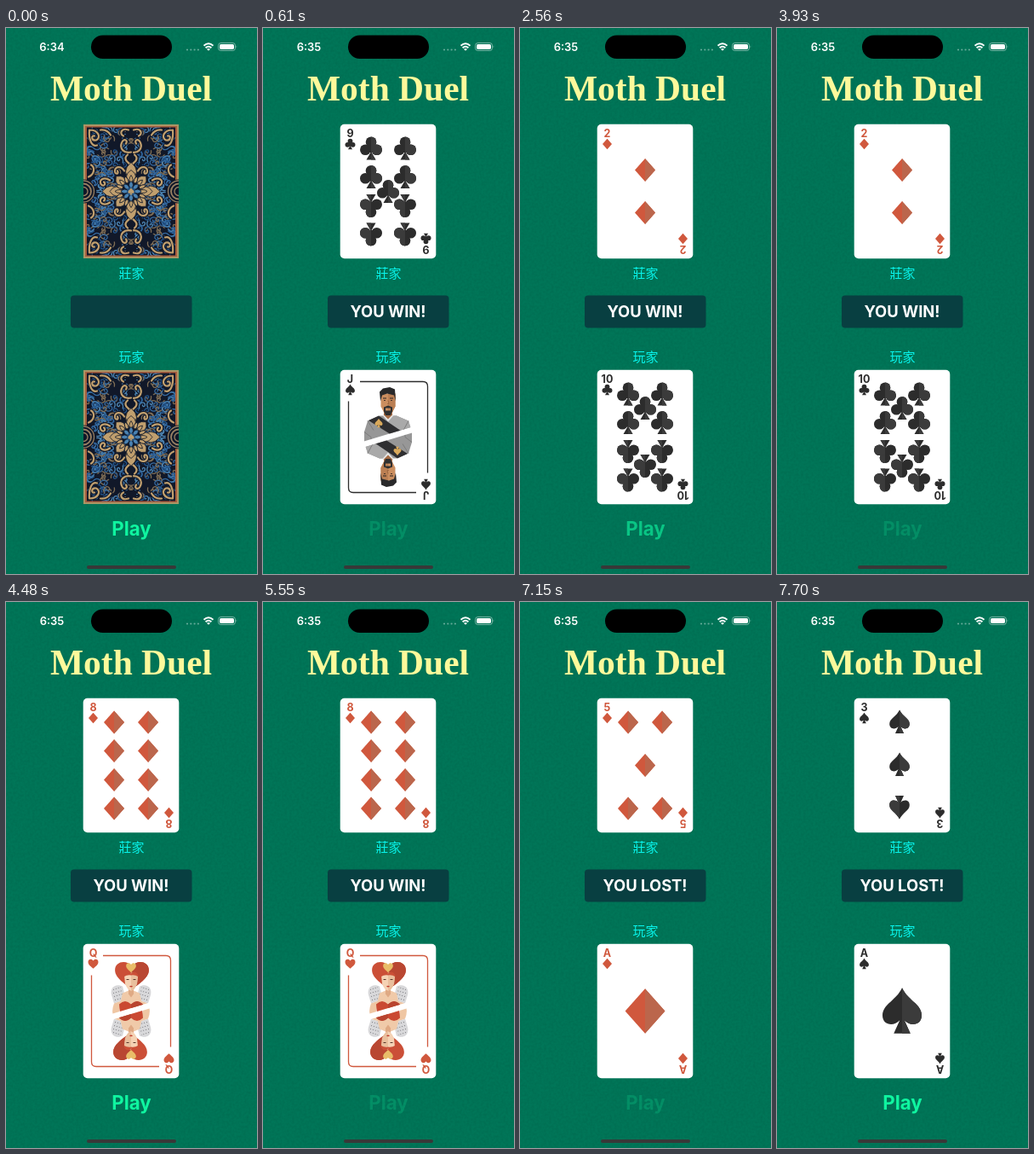
An HTML page for the animation above (8 s loop, 295 by 640 pixels).

```html
<!DOCTYPE html>
<html lang="zh-Hant">
<head>
<meta charset="utf-8">
<title>Moth Duel</title>
<style>
html, body { margin: 0; width: 100%; height: 100%; overflow: hidden; background: #007456; }
svg { display: block; width: 100vw; height: 100vh; }
text { text-anchor: middle; font-family: Inter, "Open Sans", sans-serif; font-weight: 600; }
.title { font: 700 41.5px "Liberation Serif", "Noto Serif", serif; fill: #fdf99b; }
.label { font: 500 15px "Noto Sans CJK TC", "Noto Sans CJK", "Noto Sans CJK SC", sans-serif; fill: #08f3ea; }
.index { font-size: 12.5px; font-weight: 700; }
.bold { font-weight: 700; }
</style>
</head>
<body>
<svg id="stage" viewBox="0 0 295 640" preserveAspectRatio="none"></svg>
<script>
const LOOP = 8000;
const RED = "#d0583d", BLACK = "#2c2c2c", TAN = "#c09f6e", NAVY = "#111829";

// Rounds: press time, deal time, dealer card, player card, message
const ROUNDS = [
  [500, 610, "9C", "JS", "YOU WIN!"],
  [2220, 2340, "2D", "10C", "YOU WIN!"],
  [3930, 4030, "8D", "QH", "YOU WIN!"],
  [5550, 5660, "5D", "AD", "YOU LOST!"],
  [7150, 7260, "3S", "AS", "YOU LOST!"]
];
// Button opacity by time since the press
const FADE = [[0, .2], [210, .4], [320, .63], [430, .84], [540, 1]];

const SUITS = {
  D: '<path d="M0-13.500L12 0 0 13.500-12 0Z"/>',
  S: '<path d="M0-14C2-10 4-8.500 7-5.500C10-3 11.800-.5 11.800 2.500C11.800 8.500 5 9.500 1.400 5.500L5 13.500H-5L-1.400 5.500C-5 9.500-11.800 8.500-11.800 2.500C-11.800-.5-10-3-7-5.500C-4-8.500-2-10 0-14Z"/>',
  C: '<circle cy="-7.200" r="6.300"/><circle cx="-6.700" cy="1.800" r="6.300"/><circle cx="6.700" cy="1.800" r="6.300"/>' +
     '<path d="M-3-4H3V5H-3ZM0 4L5.500 13.500H-5.500Z"/>',
  H: '<path d="M0 12.500C-4 8-13 3-13-4.500C-13-12-4-14 0-7.500C4-14 13-12 13-4.500C13 3 4 8 0 12.500Z"/>'
};

const isRed = s => s === "D" || s === "H";
const ink = s => isRed(s) ? RED : BLACK;

function pip(s, x, y, scale = 1, flip = false) {
  const shade = isRed(s) ? "#bb664c" : "#3b3b3b";
  return `<g transform="translate(${x} ${y}) rotate(${flip ? 180 : 0}) scale(${scale})">
    <g fill="${ink(s)}">${SUITS[s]}</g>
    ${scale < .6 ? "" : `<g fill="${shade}" clip-path="url(#right)">${SUITS[s]}</g>`}</g>`;
}

const twice = art => art + `<g transform="rotate(180)">${art}</g>`;
const mirror = art => art + `<g transform="scale(-1 1)">${art}</g>`;

// Pip places from the card centre; each is repeated upside down
const COLS = [-20, 20];
const pairs = rows => rows.flatMap(y => COLS.map(x => [x, y]));
const LAYOUT = {
  2: [[0, -25]],
  5: pairs([-50.5]),
  8: pairs([-50.5, -17]),
  9: pairs([-50.5, -17]),
  10: [...pairs([-50.5, -17]), [0, -34]]
};

function pips(rank, s) {
  if (rank === "A") return pip(s, 0, 0, 1.95);
  if (rank === "3") return pip(s, -3, -51) + pip(s, -3, -1) + pip(s, -3, 49, 1, true);
  const flip = s !== "D";
  let art = LAYOUT[rank].map(([x, y]) => pip(s, x, y) + pip(s, x, -y, 1, flip)).join("");
  if (rank === "9" || rank === "5") art += pip(s, 0, 0);
  return art;
}

const JACK = `
  <path d="M-28 14V-6L-24-19-10-25H10L24-19 28-6V12Z" fill="#979797"/>
  <path d="M0-25H10L24-19 28-6V12H0Z" fill="#a9a9a9"/>
  <path d="M-28-6L-20 0V12M-24-19L-17-8M24-19L18-8 28-4" fill="none" stroke="#7c7c7c" stroke-width="1"/>
  <path d="M-23-19.500L-11-25 26 0 24 10Z" fill="#2f2f31"/>
  <path d="M-7-26L0-18 7-26Z" fill="#e6e6e6"/>
  <path d="M-5-34H5V-26L0-21-5-26Z" fill="#a56b44"/>
  <g transform="translate(-11 -16.500) scale(.38)" fill="#d9a95c">${SUITS.S}</g>
  <path d="M-8.500-51H8.500V-36L4-27H-4L-8.500-36Z" fill="#cb8e5f"/>
  <path d="M0-51H8.500V-36L4-27H0Z" fill="#bb7f53"/>
  <path d="M-9-42L-10-53-6-57 2-58.500 8-56 9-42 7-49-1-51-7-49Z" fill="#29292a"/>
  <path d="M-5-30V-35L0-37 5-35V-30L3-25.500H-3ZM-3-34V-31H3V-34Z" fill="#303030" fill-rule="evenodd"/>
  <path d="M-6-45.500H-2M2-45.500H6" stroke="#2b2522" stroke-width="1.200"/>
  <path d="M-5-43H-3M3-43H5" stroke="#45342a" stroke-width="1.200"/>
  <path d="M0-43L1-39H-1" fill="none" stroke="#925d3a" stroke-width=".7"/>`;

const SLEEVE = `
  <path d="M-10-29C-19-33-25-27-23-19L-20-9-11-12-8-21Z" fill="#d8d8da"/>
  <path d="M-21-25L-12-28M-21-21L-10-24M-20-17L-10-20M-19-13L-11-15" stroke="#77777c" stroke-width="1" stroke-dasharray="1 2"/>
  <path d="M-20-9L-11-12-14 0-10 12H-17Q-25 4-20-9Z" fill="#efc6a3"/>`;

const QUEEN = `
  <g transform="translate(1 -42) scale(1.530 1.350)">
    <g fill="#cb4f37">${SUITS.H}</g><g fill="#b94732" clip-path="url(#right)">${SUITS.H}</g></g>
  ${mirror(SLEEVE)}
  <path d="M-10-21L-3-24H3L10-21 13-8 11 12H-12L-13-8Z" fill="#f0caa9"/>
  <path d="M-14-8Q-7-15 0-8Q7-15 14-8L12 14H-12Z" fill="#ca4932"/>
  <path d="M0-8Q7-15 14-8L12 14H0Z" fill="#b8442f"/>
  <path d="M-3-27H3V-20L0-16-3-20Z" fill="#dfa984"/>
  <path d="M-8-42Q0-47 8-42L7-32Q4-24 0-24Q-4-24-7-32Z" fill="#f5d2b4"/>
  <path d="M0-45Q5-45 8-42L7-32Q4-24 0-24Z" fill="#e9bf9d"/>
  <path d="M-9-40Q-6-49 0-44Q6-49 9-40Q4-43 0-42Q-4-43-9-40Z" fill="#cb4f37"/>
  <path d="M-5.500-37H-2.500M2.500-37H5.500" stroke="#57372c" stroke-width="1.100"/>
  <path d="M-2-29Q0-30.500 2-29Q0-27 -2-29Z" fill="#c03d2d"/>
  <g transform="translate(0 -51) scale(.45)" fill="#e9bd69">${SUITS.H}</g>`;

function court(rank, s) {
  const frame = `<path d="M-33-65H41Q46.500-65 46.500-59.500V42" fill="none" stroke="${ink(s)}" stroke-width="1.300"/>`;
  return twice(frame + `<g clip-path="url(#half)">${rank === "J" ? JACK : QUEEN}</g>`);
}

function face(code) {
  const s = code.slice(-1), rank = code.slice(0, -1);
  const corner = `<text class="index" x="-44.500" y="-63.500" fill="${ink(s)}">${rank}</text>` + pip(s, -44.5, -55.5, .46);
  return `<rect x="-56.300" y="-78.700" width="112.600" height="157.400" rx="5" fill="#fff"/>` +
    twice(corner) + ("JQ".includes(rank) ? court(rank, s) : pips(rank, s));
}

function random(seed) {
  return () => (seed = (seed * 16807) % 2147483647) / 2147483647;
}

function back() {
  const rnd = random(77), tones = ["#23548a", "#3469a0", "#4d86b5", "#806e55"];
  let leaves = "";
  for (let i = 0; i < 90; i++) {
    const x = 2 + rnd() * 48, y = -4 - rnd() * 70, a = rnd() * 360;
    leaves += `<path transform="translate(${x.toFixed(1)} ${y.toFixed(1)}) rotate(${a.toFixed()})"
      d="M-4 2C-3-4 4-4 4 0C4 3 0 3 1 0" stroke="${tones[i % 4]}"/>`;
  }
  const scrolls = `M0-46C8-44 14-50 11-57C9-63 3-60 6-56M3-72C12-75 14-67 9-65
    M49-72C38-72 35-63 41-60C47-59 47-66 43-65M49-72C50-60 46-52 40-54M36-72Q28-73 24-66
    M50-17C43-20 42-28 47-31M0-31C6-35 9-39 4-43
    M8-24C12-31 20-29 19-23C18-19 14-21 16-24M25-13C32-18 39-13 35-8C32-5 29-9 32-11`;
  const quarter = `<g fill="none" stroke-linecap="round"><g stroke-width="1.300">${leaves}</g>
    <path d="${scrolls}" stroke="${NAVY}" stroke-width="4.500"/><path d="${scrolls}" stroke="${TAN}" stroke-width="2.200"/></g>`;
  const ring = (n, inner, outer, w, fill) => Array.from({ length: n }, (_, i) =>
    `<path transform="rotate(${i * 360 / n})" d="M0-${inner}Q${-w}-${(inner + outer) / 2} 0-${outer}Q${w}-${(inner + outer) / 2} 0-${inner}Z"
      fill="${fill}" stroke="${NAVY}" stroke-width=".8"/>`).join("");
  const medal = `<g transform="translate(56 0)"><circle r="14" fill="${NAVY}"/>
    <g fill="none" stroke="#998163"><circle r="12.500" stroke-width="1.300"/><circle r="9" stroke-width="1.800"/><circle r="5" stroke-width="1.300"/></g></g>`;
  return `<g clip-path="url(#card)"><rect x="-56" y="-78.500" width="112" height="157" fill="${NAVY}"/>
    ${mirror(quarter + `<g transform="scale(1 -1)">${quarter}</g>`)}
    <rect x="-53" y="-76" width="106" height="152" fill="none" stroke="#a85d3e" stroke-width="2"/>
    <rect x="-55" y="-77.500" width="110" height="155" fill="none" stroke="#a99565" stroke-width="2"/>
    ${mirror(medal)}
    ${ring(4, 12, 34, 13, TAN)}${ring(8, 10, 25, 11, TAN)}${ring(16, 9, 19, 4, TAN)}
    <circle r="11" fill="${NAVY}"/>${ring(8, 3, 12, 5, "#4a82b2")}
    <circle r="5" fill="#23517f"/><g transform="scale(.3)" fill="${TAN}">${SUITS.S}</g></g>`;
}

const status = `
  <text id="clock" x="54" y="26.500" font-size="13" fill="#fff"></text>
  <rect x="100" y="8.500" width="95" height="27.500" rx="13.700"/>
  <g fill="#fff" opacity=".4">${[213, 217.3, 221.6, 225.9].map(x => `<circle cx="${x}" cy="25.500" r="1.100"/>`).join("")}</g>
  <g fill="none" stroke="#fff" stroke-width="1.900"><path d="M232.500 20.800Q238 15.800 243.500 20.800M234.600 23.300Q238 20.300 241.400 23.300"/></g>
  <path d="M236 24.700Q238 23.200 240 24.700L238 26.800Z" fill="#fff"/>
  <rect x="249.500" y="17.500" width="20" height="9" rx="3" fill="none" stroke="#fff" stroke-opacity=".45"/>
  <rect x="251" y="19" width="17" height="6" rx="1.700" fill="#fff"/>
  <path d="M270.600 20.500Q272.200 22 270.600 23.500Z" fill="#fff" opacity=".5"/>`;

const slot = (y, i) => `<g transform="translate(147 ${y})">
  <g class="deal">${back()}</g>${ROUNDS.map(r => `<g class="deal">${face(r[i])}</g>`).join("")}</g>`;

const stage = document.getElementById("stage");
stage.innerHTML = `
  <defs>
    <clipPath id="right"><rect width="20" height="40" y="-20"/></clipPath>
    <clipPath id="half"><path d="M-40-70H40V-15.500L-40 8.500Z"/></clipPath>
    <clipPath id="card"><rect x="-56" y="-78.500" width="112" height="157"/></clipPath>
    <filter id="felt" x="0" y="0" width="1" height="1" color-interpolation-filters="sRGB">
      <feTurbulence type="fractalNoise" baseFrequency=".35" numOctaves="2" seed="4"/>
      <feColorMatrix values="0 0 0 0 0  0 0 0 0 0  0 0 0 0 0  .12 0 0 0 -.035"/>
    </filter>
  </defs>
  <rect width="295" height="640" fill="#007658"/>
  <rect width="295" height="640" filter="url(#felt)"/>
  ${status}
  <text class="title" x="147" y="85">Moth Duel</text>
  ${slot(191.5, 2)}
  <text class="label" x="147.500" y="293">莊家</text>
  <rect x="76" y="313.500" width="142.500" height="38" rx="4" fill="#083f41"/>
  <text id="result" class="bold" x="147" y="339.300" font-size="18.400" fill="#fff"></text>
  <text class="label" x="147.500" y="391">玩家</text>
  ${slot(479.5, 3)}
  <text id="play" class="bold" x="147.500" y="594.500" font-size="22.300" fill="#0ff5a0">Play</text>
  <rect x="95" y="630" width="105" height="4" rx="2" fill="#383838"/>`;

const clock = document.getElementById("clock");
const result = document.getElementById("result");
const play = document.getElementById("play");
const deals = [...stage.querySelectorAll(".deal")];
const perSlot = ROUNDS.length + 1;

function draw(t) {
  const dealt = ROUNDS.filter(r => t >= r[1]).length;
  const press = ROUNDS.filter(r => t >= r[0]).pop();
  deals.forEach((g, i) => g.style.display = i % perSlot === dealt ? "" : "none");
  clock.textContent = dealt ? "6:35" : "6:34";
  result.textContent = dealt ? ROUNDS[dealt - 1][4] : "";
  play.setAttribute("opacity", press ? FADE.filter(f => t - press[0] >= f[0]).pop()[1] : 1);
}

const start = performance.now();
function tick() {
  draw((performance.now() - start) % LOOP);
  requestAnimationFrame(tick);
}
tick();
</script>
</body>
</html>
```
